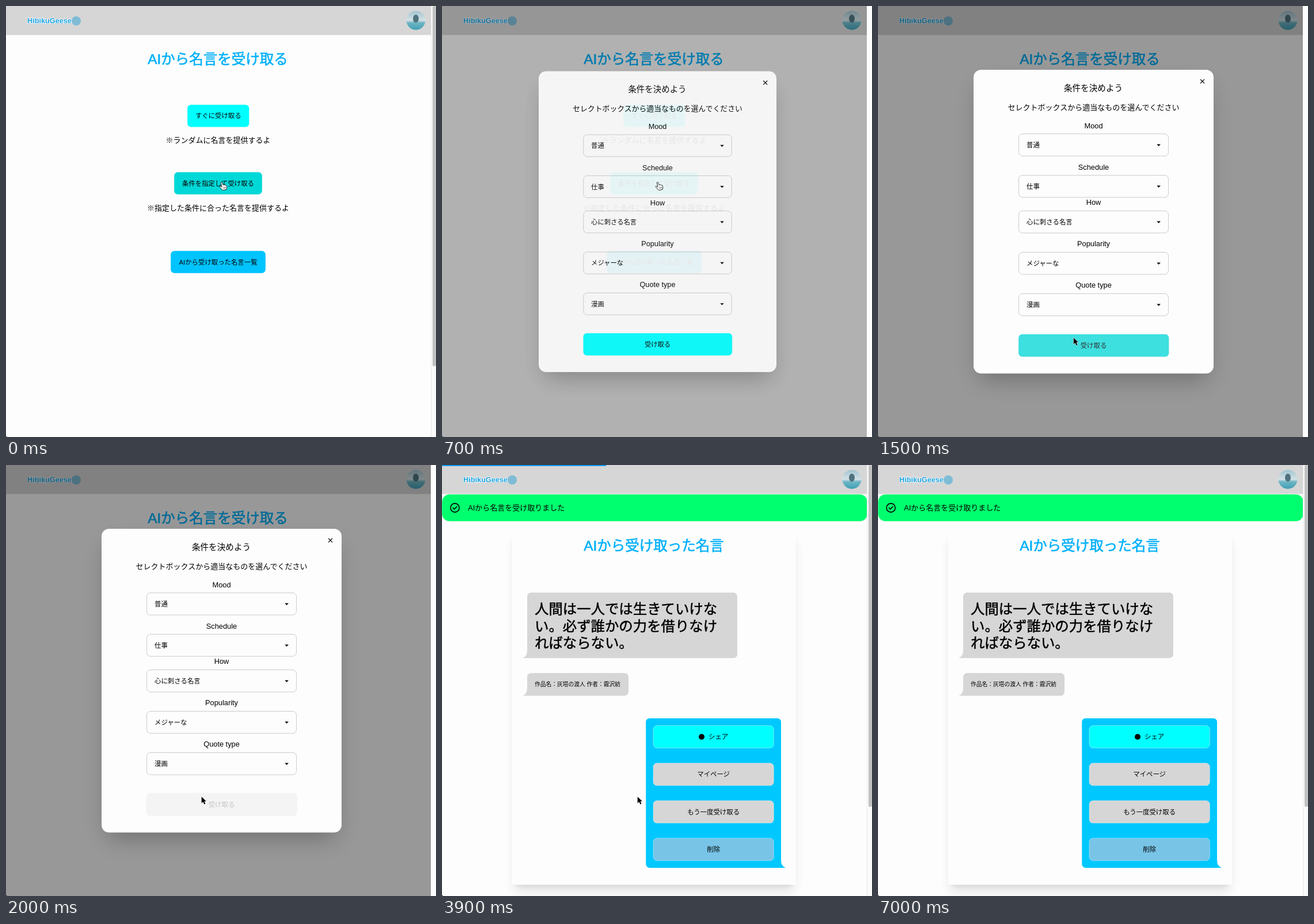
An HTML page for the animation above (7100 ms loop, 747 by 750 pixels).

```html
<!DOCTYPE html>
<html lang="ja">
<head>
<meta charset="utf-8">
<title>名言を受け取る</title>
<style>
html, body { margin: 0; width: 100%; height: 100%; overflow: hidden; background: #fdfdfd; }
svg { display: block; width: 100%; height: 100%; }
text { font-family: "Liberation Sans", "Noto Sans CJK JP", "Noto Sans CJK", sans-serif; white-space: pre; }
.edge { stroke: #f2f2f2; stroke-opacity: .55; stroke-width: .8; }
</style>
</head>
<body>
<svg id="stage" viewBox="0 0 747 750"></svg>
<script>
const LOOP = 7100, STEP = 100;
const BG = '#fdfdfd', GRAY = '#d6d6d6', CYAN = '#00ffff', HOVER = '#00d8d8', SKY = '#00c8ff', TITLE = '#00b0fa';
const MID = 374.5;
const SELECTS = [
  ['Mood', '普通', 222, 208],
  ['Schedule', '仕事', 294, 280],
  ['How', '心に刺さる名言', 356, 341.5],
  ['Popularity', 'メジャーな', 428, 413.5],
  ['Quote type', '漫画', 500, 485.5]
];
// Pointer stops: time, x, y.
const PATH = [
  [800, 374.5, 306.5], [1300, 339.7, 577.2], [5400, 339.7, 577.2],
  [5800, 371, 359], [5900, 371, 359], [6200, 382, 265], [6300, 382, 265], [7000, 410, -16]
];

// Text is placed by its vertical centre.
const text = (s, x, cy, size, opt = '') =>
  `<text x="${x}" y="${cy + size * 0.38}" font-size="${size}" ${opt}>${s}</text>`;
const centred = (s, x, cy, size, opt = '') => text(s, x, cy, size, `text-anchor="middle" ${opt}`);
const box = (x, y, w, h, r, fill, opt = '') =>
  `<rect x="${x}" y="${y}" width="${w}" height="${h}" rx="${r}" fill="${fill}" ${opt}/>`;
const button = (s, x, y, w, fill, id = '') =>
  box(x, y, w, 39, 6.5, fill, `class="edge" ${id}`) + centred(s, x + w / 2, y + 19.3, 11.4);
const heading = (s, cy) =>
  centred(s, 368, cy, 24.5, `fill="${TITLE}" stroke="${TITLE}" stroke-width=".6"`);
const scrollbar = h =>
  box(738, 0, 9, 750, 0, '#fafafa') + box(738, 0, 1, 750, 0, '#e8e8e8') + box(741, 0, 6, h, 3, '#c1c1c1');

const defs = `<defs>
  <linearGradient id="photo" x1="0" y1="0" x2="0" y2="1">
    <stop offset="0" stop-color="#9fc3d0"/><stop offset=".5" stop-color="#d5e2e6"/>
    <stop offset=".62" stop-color="#6fb6c4"/><stop offset="1" stop-color="#3f9fb5"/>
  </linearGradient>
  ${[4, 10, 20].map(s => `<filter id="blur${s}" x="-30%" y="-30%" width="160%" height="160%"><feGaussianBlur stdDeviation="${s}"/></filter>`).join('')}
</defs>`;

const header = box(0, 0, 738, 50.5, 0, GRAY) +
  '<circle cx="122" cy="26" r="8" fill="#7fbcd6"/>' +
  text('HibikuGeese', 37, 25.5, 12.7, 'font-weight="700" fill="#1ba4e2" stroke="#fff" stroke-width="1.5" paint-order="stroke"') +
  '<circle cx="712" cy="25" r="16.5" fill="url(#photo)"/><ellipse cx="712" cy="22" rx="5" ry="7" fill="#50727f"/>';

const startPage = `<g id="start">
  ${heading('AIから名言を受け取る', 92)}
  ${button('すぐに受け取る', 315, 171.7, 107.5, CYAN)}
  ${centred('※ランダムに名言を提供するよ', 368.5, 233.5, 13)}
  ${button('条件を指定して受け取る', 292, 289, 153, HOVER, 'id="pick"')}
  ${centred('※指定した条件に合った名言を提供するよ', 368.5, 350.7, 13)}
  ${button('AIから受け取った名言一覧', 286, 426, 165, '#00c4ff')}
  <g id="startBar">${scrollbar(627)}</g>
</g>`;

const leftBubble = (y, w, h) =>
  box(148, y, w, h, 6.5, GRAY) +
  `<path d="M148 ${y + h - 13}Q148 ${y + h - 3} 140 ${y + h}H156V${y + h - 13}Z" fill="${GRAY}"/>`;

const quote = ['人間は一人では生きていけな', 'い。必ず誰かの力を借りなけ', 'ればならない。'];

const resultPage = `<g id="result">
  ${box(0, 51, 739, 47, 13, '#00ff6e', 'class="edge"')}
  <path d="M19.3 74.6l2.2 2.2 4.2-4.3M30 74.5a7.6 7.6 0 1 1-15.2 0a7.6 7.6 0 1 1 15.2 0" fill="none" stroke="#000" stroke-width="1.6" stroke-linecap="round" stroke-linejoin="round"/>
  ${text('AIから名言を受け取りました', 45, 74.5, 13)}
  ${box(126, 131, 485, 611, 6, '#000', 'opacity=".1" filter="url(#blur10)"')}
  ${box(127, 122.5, 483, 609, 6, '#000', 'opacity=".1" filter="url(#blur4)"')}
  ${box(122, 111, 493, 619.5, 0, BG)}
  ${heading('AIから受け取った名言', 139.5)}
  ${leftBubble(222, 365, 114)}
  ${quote.map((s, i) => text(s, 161, 250 + i * 29.3, 24.4, 'stroke="#000" stroke-width=".5"')).join('')}
  ${leftBubble(362, 176, 39.5)}
  ${text('作品名：灰塔の渡人 作者：霧沢紡', 161, 381.7, 9.75)}
  ${box(354.2, 440.7, 234.8, 260.3, 6.5, SKY)}
  <path d="M589 688Q589 698 597 701H580V688Z" fill="${SKY}"/>
  ${box(367, 453.5, 209.3, 39, 6.5, CYAN, 'class="edge"')}
  <circle cx="451" cy="473" r="5"/>
  ${text('シェア', 463, 473, 11.4)}
  ${button('マイページ', 367, 518.8, 209.3, GRAY)}
  ${button('もう一度受け取る', 367, 584.1, 209.3, GRAY)}
  ${button('削除', 367, 649.4, 209.3, '#78c4e7')}
  ${scrollbar(595)}
</g>`;

const field = ([label, value, y, ly]) =>
  centred(label, MID, ly, 12.8) +
  box(244.5, y + 0.5, 260, 38.5, 6.5, 'none', 'stroke="#cbcbcb"') +
  text(value, 258, y + 19.8, 11.4) +
  `<path d="M484.3 ${y + 18.5}h6.6l-3.3 3.5z"/>`;

const modal = `<g id="dialog">
  <rect id="shade" width="738" height="750"/>
  <g id="panel">
    ${box(176, 141, 397, 508, 8, '#000', 'opacity=".27" filter="url(#blur20)"')}
    ${box(166, 111, 417, 528.5, 13, BG)}
    <path d="M560 127.6l7 7m0-7l-7 7" stroke="#000" stroke-width="1.3"/>
    ${centred('条件を決めよう', 374, 142, 14.6)}
    ${centred('セレクトボックスから適当なものを選んでください', MID, 176, 13)}
    ${SELECTS.map(field).join('')}
    <rect id="send" class="edge" x="244" y="571" width="261.5" height="39.5" rx="6.5"/>
    ${centred('受け取る', MID, 590.7, 11.4, 'id="sendText"')}
  </g>
</g>`;

const cursors = `<g id="hand" fill="#fff" stroke="#222" stroke-width="1" stroke-linejoin="round">
    <path d="M-1.3 .6Q-.2-.8 1 .7L2.6 5Q3.6 4 4.8 5Q6 4.2 7 5.4Q8.6 5 9 7Q9.6 10 8.4 12.8L2.2 14.2Q-.6 11.6-3 8.6Q-3.6 7-2 7Q-.6 7.6.6 8.6Z"/>
    <path d="M3.2 9l.6 2.6m1.3-3l.5 2.6m1.3-3l.4 2.6" fill="none" stroke-width=".7"/>
  </g>
  <path id="arrow" d="M0 0V11.2L2.7 8.8 4.7 13.2 6.7 12.3 4.8 8.1H8.2Z" stroke="#fff" stroke-width="1" paint-order="stroke"/>`;

const stage = document.getElementById('stage');
stage.innerHTML = defs + box(0, 0, 747, 750, 0, BG) + header + startPage + resultPage +
  '<rect id="progress" height="1.8" fill="#0098ff"/>' + modal + cursors +
  '<path d="M0 748.5V750H2Z"/>';

const el = id => document.getElementById(id);
const set = (id, attrs) => { for (const k in attrs) el(id).setAttribute(k, attrs[k]); };
const show = (id, on) => set(id, { display: on ? 'inline' : 'none' });
const ramp = (t, a, b) => Math.min(1, Math.max(0, (t - a) / (b - a)));
const mix = (a, b, p) => a + (b - a) * p;
const gray = (from, to, p) => `rgb(${from.map((v, i) => Math.round(mix(v, to[i], p)))})`;

// Cubic bezier with control heights 0 and 1, solved by bisection.
function bezier(x1, x2, x) {
  let lo = 0, hi = 1, s = 0.5;
  for (let i = 0; i < 20; i++) {
    s = (lo + hi) / 2;
    const v = 3 * (1 - s) ** 2 * s * x1 + 3 * (1 - s) * s * s * x2 + s ** 3;
    if (v < x) lo = s; else hi = s;
  }
  return x >= 1 ? 1 : 3 * (1 - s) * s * s + s ** 3;
}

function pointer(t) {
  const i = PATH.findIndex(k => k[0] >= t);
  if (i < 1) return PATH[i < 0 ? PATH.length - 1 : 0].slice(1);
  const [t0, x0, y0] = PATH[i - 1], [t1, x1, y1] = PATH[i];
  const m = ramp(t, t0, t1), p = m * m * (3 - 2 * m);
  return [mix(x0, x1, p), mix(y0, y1, p)];
}

function progress(t) {
  if (t < 3900) {
    return [74 + 12.4 * (1 - (1 - ramp(t, 2300, 3600)) ** 1.5), ramp(t, 2000, 2200)];
  }
  return [mix(86, 738, 1 - (1 - ramp(t, 3850, 4150)) ** 2), 1 - ramp(t, 4050, 4300)];
}

function draw(t) {
  const done = t >= 3900, open = t > 572 && !done;
  show('start', !done);
  show('result', done);
  show('startBar', !open);
  show('dialog', open);
  set('pick', { fill: open ? CYAN : HOVER });

  const p = ramp(t, 572, 772), pop = bezier(0.4, 0.2, p), scale = mix(0.9, 1, pop);
  set('shade', { opacity: 0.4 * bezier(0.1, 0.7, p) });
  set('panel', {
    opacity: pop,
    transform: `translate(${MID} 375) scale(${scale}) translate(${-MID} -375)`
  });

  const [x, y] = pointer(t);
  const off = ramp(t, 1450, 1650), over = y > 571;
  set('send', { fill: gray(over ? [0, 216, 216] : [0, 255, 255], [244, 244, 244], off) });
  set('sendText', { fill: gray([0, 0, 0], [196, 196, 196], off) });

  const [width, alpha] = progress(t);
  set('progress', { width, opacity: alpha });

  const hot = !done && (t < 800 || (over ? off === 0 : SELECTS.some(s => y >= s[2] && y <= s[2] + 39)));
  show('hand', hot);
  show('arrow', !hot);
  set(hot ? 'hand' : 'arrow', { transform: `translate(${x} ${y})` });
}

const began = performance.now();
function tick() {
  const t = (performance.now() - began) % LOOP;
  draw(Math.floor(t / STEP) * STEP);
  requestAnimationFrame(tick);
}
tick();
</script>
</body>
</html>
```
